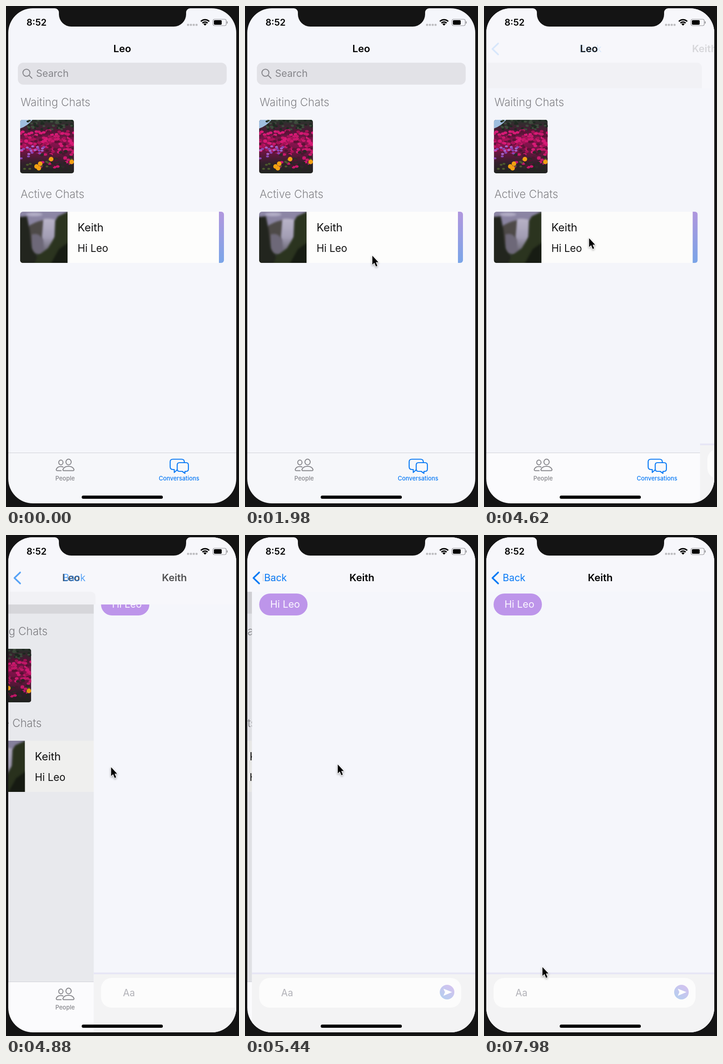
Recreate the animation shown at these times as an HTML page with a canvas. Size 511 by 1096 pixels, loop 8 s.

```html
<!DOCTYPE html>
<html lang="en">
<head>
<meta charset="utf-8">
<title>Chat list to conversation</title>
<style>
html, body { margin: 0; width: 100%; height: 100%; overflow: hidden; background: #141414; }
canvas { display: block; }
</style>
</head>
<body>
<canvas id="stage" width="511" height="1096"></canvas>
<script>
const c = document.getElementById('stage').getContext('2d');
const LOOP = 8000, PUSH = 4560;
const USER = 'Leo', FRIEND = 'Keith';
const BG = '#f5f6fb', BLUE = '#0a7af5', GRAY = '#85858a';

const clamp = v => Math.max(0, Math.min(1, v));

function box(x, y, w, h, r, fill) {
  c.beginPath();
  c.roundRect(x, y, w, h, r);
  c.fillStyle = fill;
  c.fill();
}

function dot(x, y, rx, ry, fill) {
  c.beginPath();
  c.ellipse(x, y, rx, ry, 0, 0, 7);
  c.fillStyle = fill;
  c.fill();
}

function line(d, color, width, fill) {
  const p = new Path2D(d);
  if (fill) { c.fillStyle = fill; c.fill(p); }
  c.strokeStyle = color;
  c.lineWidth = width;
  c.lineCap = c.lineJoin = 'round';
  c.stroke(p);
}

function shape(d, fill) {
  c.fillStyle = fill;
  c.fill(new Path2D(d));
}

function text(s, x, y, size, color, weight = 400, align = 'left') {
  c.font = `${weight} ${size}px Inter, Roboto, sans-serif`;
  c.textAlign = align;
  c.fillStyle = color;
  c.fillText(s, x, y);
}

function gradient(x0, y0, x1, y1, ...colors) {
  const g = c.createLinearGradient(x0, y0, x1, y1);
  colors.forEach((col, i) => g.addColorStop(i / (colors.length - 1), col));
  return g;
}

function layer(alpha, draw, dx = 0) {
  c.save();
  c.globalAlpha = alpha;
  c.translate(dx, 0);
  draw();
  c.restore();
}

function clipped(x, y, w, h, r, draw) {
  c.save();
  c.beginPath();
  c.roundRect(x, y, w, h, r);
  c.clip();
  draw();
  c.restore();
}

function random(seed) {
  return () => (seed = seed * 16807 % 2147483647) / 2147483647;
}

function flowers() {
  const rnd = random(77);
  const scatter = (n, x, y, w, h, r, ...colors) => {
    for (let i = 0; i < n; i++)
      dot(x + rnd() * w, y + rnd() * h, r, r * .7, colors[i % colors.length]);
  };
  box(31, 249, 118, 118, 0, gradient(0, 249, 0, 367, '#27352b', '#4a1a35', '#8c1250', '#6a1540', '#33202c', '#202420'));
  shape('M31 249H58Q48 262 31 268Z', '#9fbfe0');
  scatter(60, 48, 250, 100, 20, 3, '#1d2a20', '#3d4c3c');
  scatter(150, 31, 272, 118, 48, 4, '#c9186c', '#d81a76', '#a81258', '#5c1236');
  scatter(45, 75, 315, 74, 38, 4, '#c9186c', '#4a1730', '#2c2a28');
  scatter(18, 33, 306, 58, 28, 3.2, '#a864cc', '#8a46b4');
  scatter(25, 31, 335, 118, 32, 3, '#22291f', '#4c5a2c');
  for (const [x, y] of [[67, 351], [75, 345], [72, 355], [99, 335], [144, 341]]) dot(x, y, 5, 5, '#f2a012');
}

function waterfall() {
  c.filter = 'blur(2px)';
  box(25, 444, 120, 124, 0, gradient(0, 450, 0, 562, '#8d86a6', '#8a85a0', '#5f5b6a', '#3a4034', '#222b1e'));
  dot(62, 456, 18, 4, '#b3aec6');
  shape('M46 484Q62 472 84 468L80 512L48 520Z', '#4e4a48');
  shape('M82 466Q96 464 109 468L106 525Q90 548 72 540Q80 510 82 466Z', gradient(0, 466, 0, 545, '#b9b4c8', '#a39eb4', '#5d5a66'));
  shape('M56 500Q72 494 82 512L84 545L56 540Z', '#6d6878');
  shape('M25 462L46 460L52 490L56 530L80 568H25Z', '#22251e');
  shape('M140 448L114 460L108 470L107 505L92 530L70 546L60 568H140Z', '#2b341f');
  shape('M140 515L116 532L96 568H140Z', '#171c13');
  c.filter = 'none';
}

function home(u) {
  box(0, 5, 660, 973, 0, BG);
  box(26, 124, 458, 48, 12, '#e2e2e7');
  layer(clamp(1 - 4 * u), () => {
    line('M52.5 146a7.7 7.7 0 1 1-15.4 0a7.7 7.7 0 1 1 15.4 0M50.5 151.5L57 158', GRAY, 2);
    text('Search', 66, 155, 21.5, GRAY);
  });
  text('Waiting Chats', 32, 219, 24, '#848488', 350);
  clipped(31, 249, 118, 117, 5, flowers);
  text('Active Chats', 32, 420, 24, '#848488', 350);
  clipped(31, 450, 447, 112, 6, () => {
    box(31, 450, 447, 112, 0, '#fdfdfc');
    clipped(31, 450, 104, 112, 0, waterfall);
    box(467, 450, 11, 112, 0, gradient(0, 450, 0, 562, '#b197de', '#7aa5e8'));
  });
  text(FRIEND, 157, 493, 24, '#111');
  text('Hi ' + USER, 157, 538, 22.3, '#111');
}

function tabs(lit) {
  box(5, 977, 500, 111, 0, lit ? '#f6f7fa' : '#fbfbfd');
  box(5, 977, 500, 1, 0, '#cfcfd6');
  line('M125 998.5a4.7 5.2 0 1 1-9.4 0a4.7 5.2 0 1 1 9.4 0M143 997.5a5.8 6.2 0 1 1-11.6 0a5.8 6.2 0 1 1 11.6 0' +
    'M126 1016.5Q124.5 1016 125 1013.5Q128 1007 137 1007T149 1013.5Q149.5 1016.5 147 1016.5ZM121 1016.5H112Q109.5 1016 110.5 1013Q113 1007.5 120 1007.5Q123 1007.5 125 1008.5', GRAY, 2);
  text('People', 129.5, 1038, 13, GRAY, 500, 'center');
  line('M366 991.5H385Q391 991.5 391 997V1008Q391 1014 385 1014H376L369 1020.5V1014H366Q360 1014 360 1008V997Q360 991.5 366 991.5Z', BLUE, 2.2);
  line('M380.5 999H395Q400 999 400 1004V1013Q400 1018 395 1018H392.5V1022.5L386.5 1018H380.5Q375.5 1018 375.5 1013V1004Q375.5 999 380.5 999Z', BLUE, 2.2, '#f7f8fb');
  text('Conversations', 379.5, 1038, 12.9, BLUE, 500, 'center');
}

function chat() {
  box(5, 5, 510, 1083, 0, BG);
  box(21, 128, 106, 48, 24, '#bd95ea');
  text('Hi ' + USER, 45, 159, 21.7, '#fbf8ff');
  box(5, 957, 510, 4, 0, '#e7e6f5');
  box(5, 961, 510, 127, 0, '#f3f3f4');
  box(21, 969, 443, 65, 23, '#fcfcfc');
  text('Aa', 69, 1009, 21, '#b2b2b8');
  dot(433, 1000, 16, 16, gradient(423, 1012, 443, 988, '#b7cdef', '#d2c3ef'));
  shape('M425 992.5L444 1000L425 1008L428.5 1000Z', '#fff');
}

function header(u) {
  const left = (1 - u) ** 2;
  if (u > 0) box(5, 5, 500, 119 + 64 * left, 0, '#f7f7fb');
  layer(1 - u, () => text(USER, 255, 101, 22, '#000', 600, 'center'), -200 * (1 - left));
  const show = clamp(2 * u);
  layer(show, () => line('M31 82L18.5 94L31 106', BLUE, 3.6));
  layer(show, () => text('Back', 41, 101, 21.3, BLUE), 191 * left);
  layer(show, () => text(FRIEND, 255, 101, 22, '#000', 600, 'center'), 261 * left);
}

function status() {
  text('8:52', 45, 43, 20, '#000', 600);
  for (let i = 0; i < 4; i++) box(397 + i * 6.2, 39, 4.6, 4.6, 1.5, '#bdbdc0');
  c.strokeStyle = '#000';
  c.lineCap = 'butt';
  for (const [r, w] of [[2.5, 5], [8, 3], [13, 3]]) {
    c.lineWidth = w;
    c.beginPath();
    c.arc(436.5, 43, r, -Math.PI * .75, -Math.PI * .25);
    c.stroke();
  }
  line('M457.5 29H479.5Q483 29 483 32.5V39.5Q483 43 479.5 43H457.5Q454 43 454 39.5V32.5Q454 29 457.5 29Z', '#8f8f93', 1.2);
  box(456, 31, 17, 10, 2, '#000');
  box(484.3, 33.5, 1.8, 5, 1, '#8f8f93');
}

// Time, x, y of the pointer tip
const track = [
  [300, 440, 1100], [1080, 317, 576], [1240, 317, 576], [2940, 230.5, 508], [4900, 230.5, 508],
  [5440, 203.5, 502], [6560, 186.5, 575], [6980, 160, 816], [7800, 130, 938], [8000, 128, 946]
];

function pointer(t) {
  const i = track.findIndex(k => k[0] > t);
  if (i < 1) return;
  const [t0, x0, y0] = track[i - 1], [t1, x1, y1] = track[i];
  const f = (t - t0) / (t1 - t0);
  c.save();
  c.translate(x0 + (x1 - x0) * f, y0 + (y1 - y0) * f);
  c.scale(.88, .9);
  c.shadowColor = 'rgba(0,0,0,.4)';
  c.shadowBlur = 4;
  c.shadowOffsetY = 2;
  const arrow = 'M0 0V21.5L5 17L9 26L12.5 24.5L8.7 15.7H15Z';
  line(arrow, '#fff', 2.2);
  c.shadowColor = 'transparent';
  shape(arrow, '#000');
  c.restore();
}

function draw(t) {
  const w = 0.0066 * Math.max(0, t - PUSH);
  const rest = w > 9 ? 0 : (1 + w) * Math.exp(-w);
  const u = clamp((t - PUSH) / 950), off = 500 * rest;
  box(0, 0, 511, 1096, 0, '#141414');
  clipped(5, 5, 500, 1083, 54, () => {
    layer(1, () => home(u), -150 * (1 - rest));
    box(5, 5, 500, 973, 0, `rgba(0,0,0,${0.09 * (1 - rest)})`);
    tabs(u === 0);
    if (u > 0) layer(1, chat, off);
    header(u);
    if (u > 0 && u < 1) box(-20, 124, 29 + off, 64 * (1 - u) ** 2, [0, 10, 0, 0], 'rgba(0,0,0,.025)');
    status();
    box(166, 1071, 178, 7, 3.5, '#000');
  });
  shape('M100 0V5H107A9 9 0 0 1 116 14V18A27 27 0 0 0 143 45H368A27 27 0 0 0 395 18V14A9 9 0 0 1 404 5H410V0Z', '#141414');
  pointer(t);
}

function tick() {
  draw(performance.now() % LOOP);
  requestAnimationFrame(tick);
}
tick();
</script>
</body>
</html>
```
